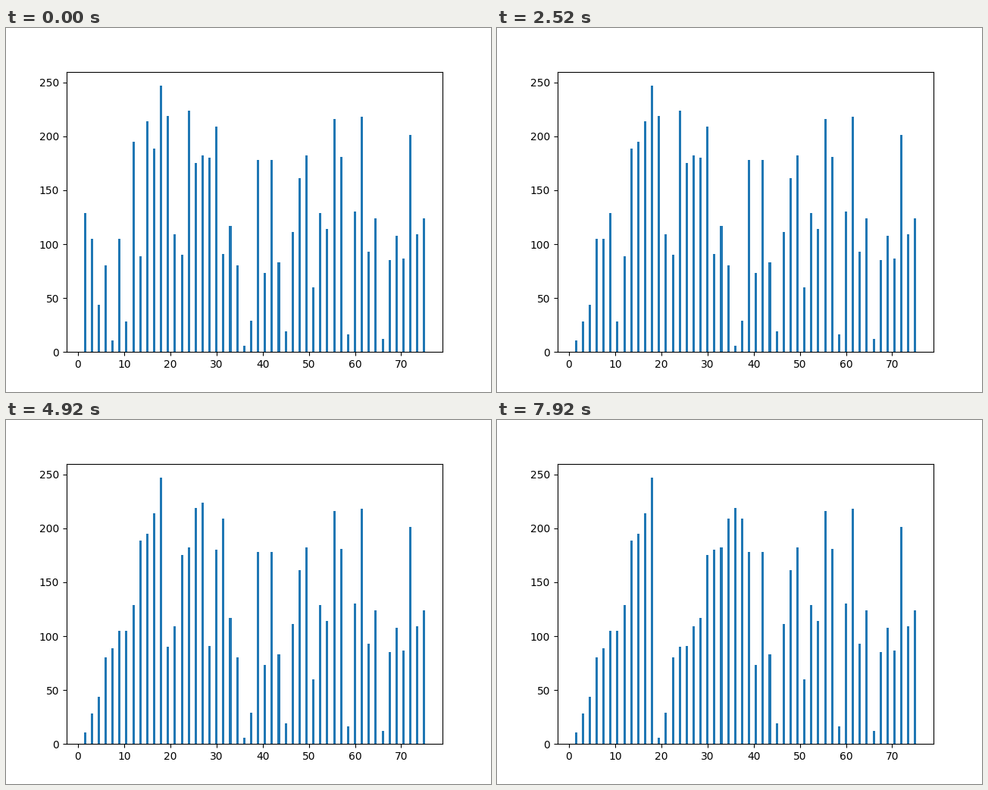
Write a matplotlib script that moves like this. It is 640 by 480 pixels and loops after 8 s.

```python
import matplotlib.pyplot as plt
from matplotlib.animation import FuncAnimation

TICK = 40          # ms per drawn frame
HOLD = 3           # frames each sorting step stays on screen
FRAMES = 200

VALUES = [129, 105, 44, 80, 11, 105, 28, 195, 89, 214,
          189, 247, 219, 109, 90, 224, 175, 182, 180, 209,
          91, 117, 80, 6, 29, 178, 73, 178, 83, 19,
          111, 161, 182, 60, 129, 114, 216, 181, 16, 130,
          218, 93, 124, 12, 85, 108, 87, 201, 109, 124]


def merge_sort(a, lo, hi):
    """Sort a[lo:hi] in place, yielding after every write that alters a bar."""
    if hi - lo < 2:
        return
    mid = (lo + hi) // 2
    yield from merge_sort(a, lo, mid)
    yield from merge_sort(a, mid, hi)
    left, right = a[lo:mid], a[mid:hi]
    for k in range(lo, hi):
        take_left = not right or (left and left[0] <= right[0])
        value = (left if take_left else right).pop(0)
        if a[k] != value:
            a[k] = value
            yield list(a)


steps = [VALUES] + list(merge_sort(list(VALUES), 0, len(VALUES)))

fig, ax = plt.subplots(figsize=(6.4, 4.8), dpi=100)
xs = [1.5 * (i + 1) for i in range(len(VALUES))]
bars = ax.bar(xs, VALUES, width=0.5, color="#1f77b4")
ax.set_ylim(0, 260)


def draw(frame):
    for bar, height in zip(bars, steps[frame // HOLD]):
        bar.set_height(height)
    return list(bars)


def reset():
    return draw(0)


anim = FuncAnimation(fig, draw, frames=FRAMES, init_func=reset,
                     interval=TICK, repeat=True, repeat_delay=0, blit=False)
plt.show()
```
